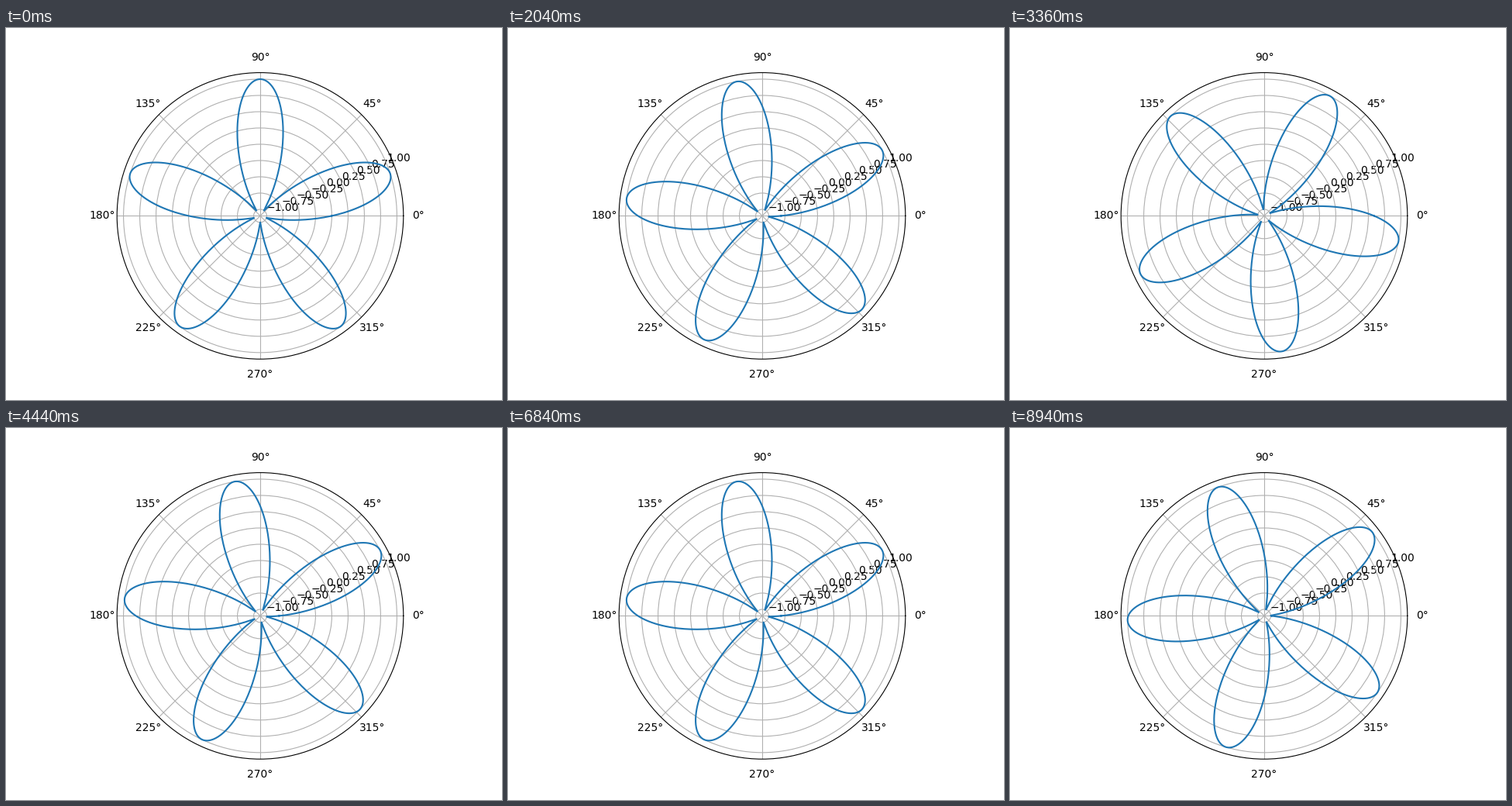
These frames come from a looping animation (640 by 480 pixels, 9 s). A matplotlib script:

```python
import numpy as np
import matplotlib.pyplot as plt
from matplotlib.animation import FuncAnimation

FRAMES = 150
INTERVAL = 60   # ms
CYCLE = 40      # frames per full turn of the phase
PETALS = 5

theta = np.linspace(0, 2 * np.pi, 1000)


def radius(i):
    return np.sin(PETALS * theta + 2 * np.pi * i / CYCLE)


fig = plt.figure(figsize=(6.4, 4.8), dpi=100)
ax = fig.add_subplot(projection="polar")
line, = ax.plot(theta, radius(0), color="#1f77b4", lw=1.5)
ax.set_ylim(-1.1, 1.1)


def update(i):
    line.set_ydata(radius(i))
    return line,


anim = FuncAnimation(fig, update, frames=FRAMES, interval=INTERVAL,
                     init_func=lambda: update(0), repeat=True, repeat_delay=0)
plt.show()
```
